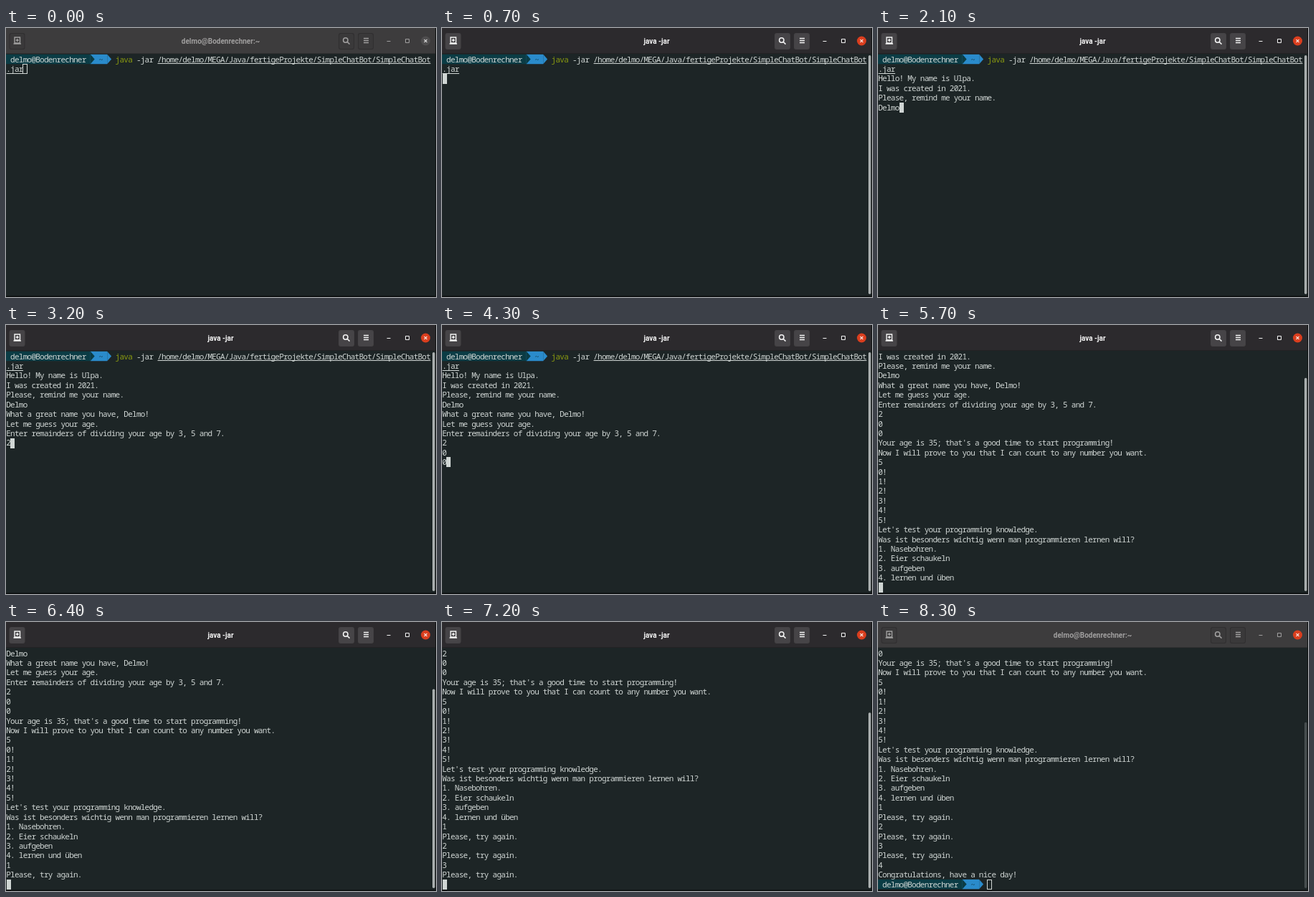
Animation of 600x375 px, one loop 8.4 s. Source, as an HTML page with a canvas:

```html
<!DOCTYPE html>
<html lang="en">
<head>
<meta charset="utf-8">
<title>Terminal chat bot</title>
<style>
  html, body { margin: 0; height: 100%; overflow: hidden; background: #000; }
  canvas { display: block; }
</style>
</head>
<body>
<canvas id="stage" width="600" height="375"></canvas>
<script>
const ctx = document.getElementById('stage').getContext('2d');
const LOOP = 8400, COL = 5.86, ROW = 13.42, LEFT = 0.6, TOP = 36.8, ROWS = 25;
const BACK = '#1d2526', TEXT = '#d0d6d4', TEAL = '#0b3c45', BLUE = '#2a8bcb';
const SHELL_TITLE = 'delmo@Bodenrechner:~';
const PROMPT = ' delmo@Bodenrechner   ~   ';
const PATH = '/home/delmo/MEGA/Java/fertigeProjekte/SimpleChatBot/SimpleChatBot';
const RUN = 700, EXIT = 7700, BLUR = 8100;
const RETRY = '\nPlease, try again.\n';

// [time, text appended to the terminal]
const script = [
  [0, PROMPT + 'java -jar ' + PATH + '\n.jar'],
  [100, ''],
  [RUN, '\n'],
  [800, 'Hello! My name is Ulpa.\nI was created in 2021.\nPlease, remind me your name.\n'],
  [1200, 'D'], [1600, 'e'], [1700, 'l'], [1800, 'm'], [2000, 'o'],
  [2300, '\nWhat a great name you have, Delmo!\nLet me guess your age.\n' +
    'Enter remainders of dividing your age by 3, 5 and 7.\n'],
  [3200, '2'], [3400, '\n'], [3700, '0'], [3900, '\n'], [4200, '0'],
  [4800, "\nYour age is 35; that's a good time to start programming!\n" +
    'Now I will prove to you that I can count to any number you want.\n'],
  [5300, '5'],
  [5700, "\n0!\n1!\n2!\n3!\n4!\n5!\nLet's test your programming knowledge.\n" +
    'Was ist besonders wichtig wenn man programmieren lernen will?\n' +
    '1. Nasebohren.\n2. Eier schaukeln\n3. aufgeben\n4. lernen und üben\n'],
  [6100, '1'], [6400, RETRY], [6600, '2'], [6800, RETRY], [7000, '3'], [7200, RETRY],
  [7400, '4'], [7600, '\nCongratulations, have a nice day!\n'],
  [EXIT, PROMPT]
];

const clamp = v => Math.max(0, Math.min(1, v));
const mix = (a, b, k) => `rgb(${a.map((v, i) => Math.round(v + (b[i] - v) * k))})`;
const colX = col => LEFT + col * COL;

function box(x, y, w, h, color) {
  ctx.fillStyle = color;
  ctx.fillRect(x, y, w, h);
}

function rounded(x, y, w, h, r, color) {
  ctx.fillStyle = color;
  ctx.beginPath();
  ctx.roundRect(x, y, w, h, r);
  ctx.fill();
}

function polygon(color, ...points) {
  ctx.fillStyle = color;
  ctx.beginPath();
  points.forEach(([x, y]) => ctx.lineTo(x, y));
  ctx.fill();
}

function icon(path, color, width = 1) {
  ctx.strokeStyle = color;
  ctx.lineWidth = width;
  ctx.stroke(new Path2D(path));
}

function drawText(line, col, y, color) {
  ctx.fillStyle = color;
  [...line].forEach((ch, i) => ctx.fillText(ch, colX(col + i + 0.5), y + 10.8));
}

function underline(col, count, y) {
  box(colX(col), Math.round(y + 12.4), count * COL, 1, TEXT);
}

function drawPrompt(y) {
  const mid = y + ROW / 2, end = y + ROW;
  box(0, y, colX(20) + 1, ROW, TEAL);
  box(colX(20), y, 4 * COL, ROW, BLUE);
  polygon(TEAL, [colX(20), y], [colX(21), mid], [colX(20), end]);
  polygon(BLUE, [colX(24), y], [colX(25), mid], [colX(24), end]);
}

function drawLine(line, index, y) {
  if (line.startsWith(PROMPT)) {
    drawPrompt(y);
    drawText(line.slice(0, 20), 0, y, TEXT);
    drawText('~', 22, y, '#174a66');
    drawText(line.slice(26, 30), 26, y, '#8a9a10');
    drawText(line.slice(30), 30, y, TEXT);
    if (index === 0) underline(36, PATH.length, y);
  } else {
    drawText(line, 0, y, TEXT);
    if (index === 1) underline(0, 4, y);
  }
}

function drawTerminal(t, focus) {
  const done = script.filter(([time]) => time <= t);
  const lines = done.map(step => step[1]).join('').split('\n');
  const last = lines.length - 1, first = Math.max(0, last - ROWS + 1);
  ctx.font = '500 11px "Noto Sans Mono", monospace';
  ctx.textAlign = 'center';
  ctx.textBaseline = 'alphabetic';
  for (let i = first; i <= last; i++) drawLine(lines[i], i, TOP + (i - first) * ROW);

  const x = Math.round(colX(lines[last].length));
  const y = Math.round(TOP + (last - first) * ROW);
  if (t < 100 || t >= BLUR) {
    ctx.strokeStyle = TEXT;
    ctx.lineWidth = 1;
    ctx.strokeRect(x - 0.5, y + 0.5, 6, 13);
  } else if ((t - done.at(-1)[0]) % 1200 < 600) {
    box(x, y, 6, 14, TEXT);
  }

  const thumb = 38 + 333 * first / (first + ROWS);
  ctx.globalAlpha = t < 1000 ? focus : 0.3 + 0.7 * focus;
  rounded(595, thumb, 3.5, 371 - thumb, 1.7, '#a9aeae');
  ctx.globalAlpha = 1;
}

function drawHeader(t, focus) {
  const shade = (dim, lit) => mix(dim, lit, focus);
  const ink = shade([160, 159, 159], [244, 244, 244]);
  box(0, 0, 600, 36, shade([61, 60, 61], [44, 42, 45]));
  box(0, 35, 600, 1, shade([48, 47, 48], [35, 33, 36]));
  for (const x of [4.5, 464, 491]) {
    rounded(x, 7, 22, 23, 3, shade([48, 47, 48], [68, 66, 69]));
    rounded(x + 1, 8, 20, 21, 2.5, shade([58, 57, 58], [70, 68, 71]));
  }
  icon('M12 13H19.5V21H12ZM15.75 15V19M13.75 17H17.75M10.5 22H21', ink, 1.4);
  icon('M477 17a3.2 3.2 0 1 1-6.4 0a3.2 3.2 0 1 1 6.4 0M476.2 19.3L479.5 22.6', ink, 1.5);
  icon('M499 14.5H506M499 17.5H506M499 20.5H506', ink, 1.3);
  icon('M531.5 18.5H536.5M557.5 15.5H562.5V20.5H557.5Z', ink);

  const lit = t < 1000 ? focus : 1;
  ctx.fillStyle = mix([78, 77, 78], [218, 62, 30], lit);
  ctx.beginPath();
  ctx.arc(585.5, 18, 6.5, 0, 2 * Math.PI);
  ctx.fill();
  icon('M583.5 16L587.5 20M587.5 16L583.5 20', mix([215, 215, 215], [244, 225, 220], lit), 1.1);

  ctx.font = 'bold 10px Roboto, sans-serif';
  ctx.textAlign = 'center';
  ctx.fillStyle = ink;
  ctx.fillText(t >= RUN && t < EXIT ? 'java -jar' : SHELL_TITLE, 299.5, 21.5);
}

function draw(now) {
  const t = now % LOOP;
  const focus = clamp((t - 50) / 300) * (1 - clamp((t - 8050) / 250));
  box(0, 0, 600, 375, BACK);
  drawTerminal(t, focus);
  drawHeader(t, focus);
  box(599, 0, 1, 375, '#0a0d0d');
  box(0, 373.5, 600, 1.5, '#0a0d0d');
  requestAnimationFrame(draw);
}
requestAnimationFrame(draw);
</script>
</body>
</html>
```
